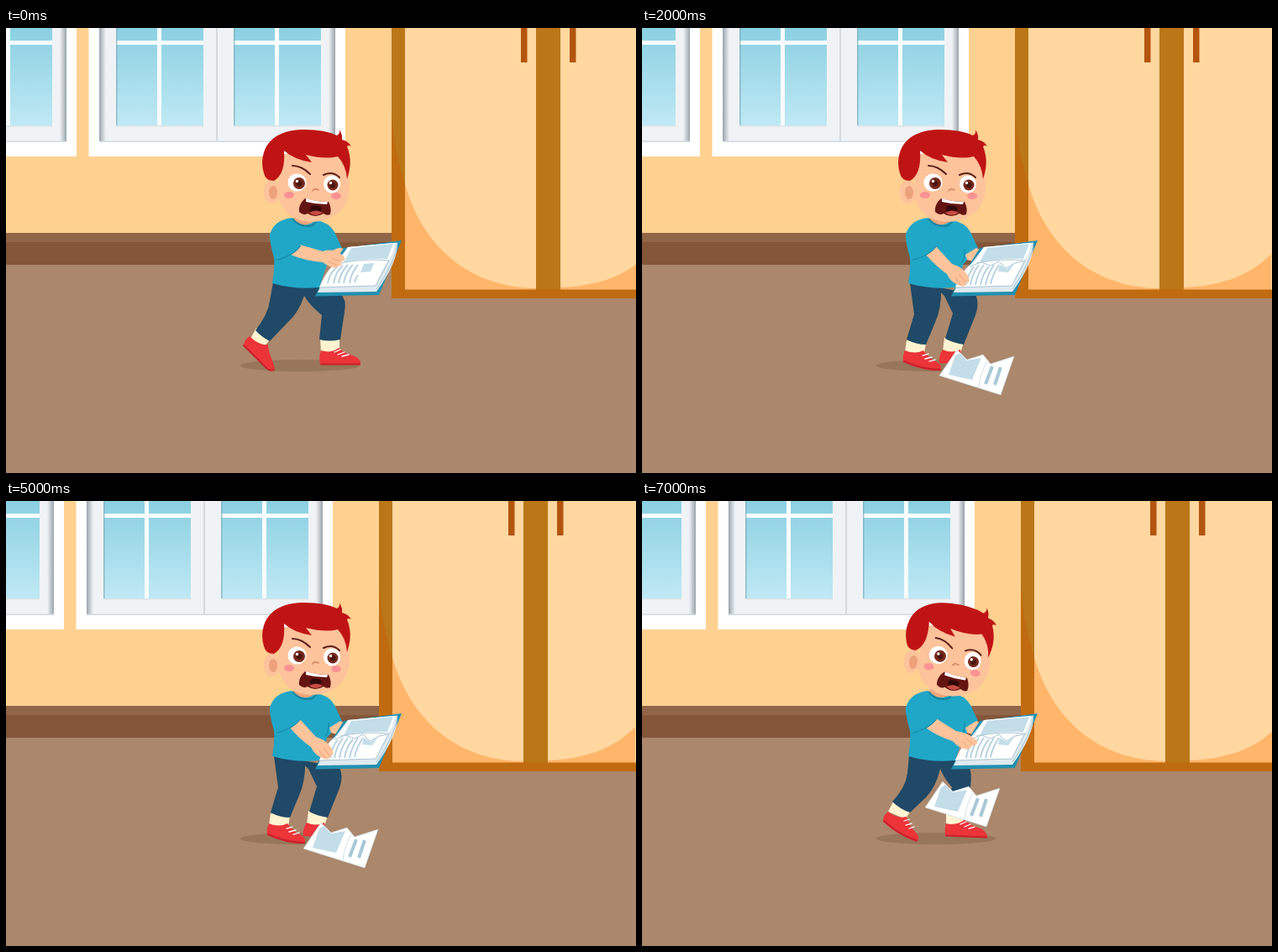
An HTML page for the animation above (8 s loop, 750 px wide and 530 px high).

```html
<!DOCTYPE html>
<html lang="en">
<head>
<meta charset="utf-8">
<title>Angry boy tearing a book</title>
<style>
  html, body { margin: 0; width: 100%; height: 100%; overflow: hidden; background: #ab876b; }
  svg { display: block; width: 750px; height: 530px; }
  .skin { fill: #fdc39b; }
  .jeans { fill: #1f4966; }
  .sock { fill: #fff3d0; }
  .shoe { fill: #ec3439; }
  .sole { fill: none; stroke: #c9202b; stroke-width: 2; stroke-linecap: round; }
  .lace { fill: none; stroke: #fff; stroke-width: 1.3; stroke-linecap: round; }
  .shirt { fill: #20a7c7; }
  .fold { fill: none; stroke: #15839f; }
  .ink { fill: #c3dde9; }
  .line { fill: none; stroke: #b9d3e0; stroke-width: 2; }
  .crease { fill: none; stroke: #ec9f78; stroke-width: 1; stroke-linecap: round; }
</style>
</head>
<body>
<svg viewBox="0 0 750 530">
  <defs>
    <linearGradient id="sky" gradientUnits="userSpaceOnUse" x1="0" y1="0" x2="0" y2="116">
      <stop stop-color="#8bd0e2"/><stop offset="1" stop-color="#bfe9f4"/>
    </linearGradient>
    <linearGradient id="shade">
      <stop stop-color="#98a4ac"/><stop offset="1" stop-color="#f0f3f5"/>
    </linearGradient>
    <g id="sash">
      <path fill="url(#sky)" d="M0 0H104V116H0Z"/>
      <path fill="#f8fbfc" d="M49 0h5v116h-5zM0 15h104v5H0z"/>
      <path fill="#7fa9b8" opacity=".7" d="M0 0h1.5v116H0z"/>
      <path fill="#dbe3e7" d="M0 116h104v1.5H0z"/>
    </g>
    <g id="window">
      <path fill="#fff" d="M98.500 0H404V153H98.500Z"/>
      <path fill="#f0f3f5" d="M111 0H392V136H111Z"/>
      <path fill="url(#shade)" d="M111 0h8v136h-8z"/>
      <path fill="url(#shade)" d="M111 0h8v136h-8z" transform="translate(503) scale(-1 1)"/>
      <path fill="#d3dbe0" d="M250 0h2v136h-2zM111 134.500h281v1.500H111z"/>
      <use href="#sash" x="131"/><use href="#sash" x="271"/>
    </g>
  </defs>

  <path fill="#ffd190" d="M0 0H750V245H0Z"/>
  <path fill="#916648" d="M0 244H750V255H0Z"/>
  <path fill="#83563a" d="M0 255H750V282H0Z"/>
  <path fill="#ab876b" d="M0 282H750V530H0Z"/>

  <g id="room">
    <use href="#window" x="-320"/><use href="#window"/>
    <path fill="#ba7617" d="M459 0H800V322H459Z"/>
    <path fill="#ffd79f" d="M475 0H631V312H475ZM660 0H800V312H660Z"/>
    <path fill="#ffb56a" d="M475 186C495 258 549 309 631 310V312H475ZM660 309C704 307 738 296 764 269V312H660Z"/>
    <path fill="#c16b10" d="M459 100C461 130 466 158 475 186V311.500H800V322H459Z"/>
    <path fill="#b3550f" d="M613 0h7.500v41h-7.500zM671 0h7.500v41h-7.500z"/>
  </g>

  <ellipse cx="350" cy="402" rx="71" ry="7" fill="#977659"/>

  <g data-pose="0">
    <path class="sock" d="M298 357L314 371L308 379L291 370Z"/>
    <path class="shoe" d="M290 367C297 374 304 378 312 377C312 387 318 396 320 406Q317 410 312 407L283 379Q283 372 290 367Z"/>
    <path class="sole" d="M283 378L311 406Q316 409 319 407"/>
    <path class="sock" d="M374 369H397V384L375 387Z"/>
    <path class="shoe" d="M375 384Q387 388 396 381Q404 388 415 391Q423 395 422 401H374Q372 392 375 384Z"/>
    <path class="sole" d="M375 400.500H421"/>
    <path class="lace" d="M391 386l7-3M395 389l8-3M400 391l8-2"/>
    <path class="jeans" d="M318 303L372 309L398 316Q406 324 403 338L398 371Q385 374 373 371L376 342Q362 331 355 319Q348 340 334 352L314 373Q304 368 297 360Q312 341 314 325Z"/>
  </g>

  <g data-pose="1">
    <path class="sock" d="M300 356L319 370L314 379L293 370Z"/>
    <path class="shoe" d="M293 370Q304 379 315 376Q318 387 327 396Q331 402 327 406Q304 398 287 382Q287 374 293 370Z"/>
    <path class="sole" d="M288 381Q305 397 327 404.500"/>
    <path class="lace" d="M312 381l6-2M314 386l7-2M318 390l6-2"/>
    <path class="sock" d="M362 372L383 375L382 386H362Z"/>
    <path class="shoe" d="M362 384Q373 387 384 380Q392 387 403 390Q411 394 411 401L361 399Q360 390 362 384Z"/>
    <path class="sole" d="M362 398.500L410 400.500"/>
    <path class="lace" d="M379 385l7-3M384 388l7-3M389 390l7-2"/>
    <path class="jeans" d="M318 303L372 309L390 316Q394 333 389 350L383 374L362 371L369 341Q360 331 355 319Q350 340 339 352L319 371Q307 367 298 358Q314 341 316 324Z"/>
  </g>

  <g data-pose="2">
    <path class="sock" d="M360 369L383 374L379 388L358 385Z"/>
    <path class="shoe" d="M358 383Q369 388 379 383Q382 391 374 400L354 399Q353 390 358 383Z"/>
    <path class="jeans" d="M348 308L397 317Q402 328 397 342L383 377Q370 375 361 370L370 340L360 319Z"/>
    <path class="sock" d="M315 372L338 375L336 388L313 386Z"/>
    <path class="shoe" d="M313 384Q325 389 335 384Q342 394 353 399Q358 403 355 408Q332 408 311 398Q310 390 313 384Z"/>
    <path class="sole" d="M312 397Q334 407 355 407"/>
    <path class="lace" d="M334 390l7-2M337 394l8-2M342 397l7-2"/>
    <path class="jeans" d="M319 304L356 310Q357 334 348 353L338 377Q326 377 315 371L324 341Z"/>
  </g>

  <path fill="#efa57d" d="M345 216H375L370 236Q357 243 342 226Z"/>
  <path class="shirt" d="M340 226Q354 241 369 229Q384 231 391 243L400 262L382 282L373 309Q345 312 317 304Q320 288 319 274Q315 260 314 247Q318 229 340 226Z"/>
  <path class="fold" stroke-width="2" d="M341 227Q351 239 365 235L370 230"/>
  <path class="fold" d="M384 264Q385 274 380 280"/>

  <g data-pose="1 2"><path class="skin" d="M385 270L398 262Q404 264 406 270L397 279L387 276Z"/></g>
  <g data-pose="0"><path class="skin" d="M387 267Q395 259 406 264L403 275H388Z"/></g>

  <!-- Book -->
  <path fill="#2290b0" d="M402 262L471 253L444 318L368 319.500L374 307Z"/>
  <path fill="#dfeaf0" d="M407 261L466 255.500Q467 278 441 314L371 315L381 295Z"/>
  <path fill="#fff" d="M407 261L463 256Q461 270 455 277Q447 288 440 307L373 309Q383 284 396 279Z"/>
  <path class="ink" d="M411 262L461 257L454 275Q427 274 402 279Z"/>
  <path fill="none" stroke="#a9c5d2" d="M398 280Q428 274 456 277L440 307L373 309M466 256Q464 278 441 311"/>
  <g data-pose="0">
    <path class="ink" d="M426 281L438 280L434 290L422 291Z"/>
    <path class="line" d="M395 284Q385 291 383 304M401 283Q392 291 390 304M407 282Q398 291 396 304M413 282Q404 291 402 304M419 282Q411 291 409 304M419 294Q416 298 415 303"/>
  </g>
  <g data-pose="1 2">
    <path fill="#fff" d="M390 284L404 279L415 283L425 278L433 286L444 280L454 278L440 306L373 308Z"/>
    <path class="ink" d="M426 282L434 287L443 281L436 291L424 290Z"/>
    <path class="line" d="M395 284Q388 293 386 306M401 282Q393 293 391 306M407 282Q399 293 397 306M413 284Q405 293 403 306M419 282Q411 294 409 306M425 282Q417 294 415 305"/>
    <path fill="none" stroke="#a9c5d2" d="M390 284L404 279L415 283L425 278L433 286L444 280L454 278"/>
  </g>

  <!-- Tearing arm -->
  <g data-pose="0">
    <path class="skin" d="M339 270L350 258L377 266Q392 261 403 273Q405 278 398 278L400 282L391 286Q382 283 377 279Q355 277 339 270Z"/>
    <path class="crease" d="M388 274l10 4M384 278l9 4"/>
  </g>
  <g data-pose="1">
    <path class="skin" d="M338 270L350 259L374 274Q390 276 399 286Q400 291 394 291L388 296Q377 295 370 286Q351 280 338 270Z"/>
    <path class="crease" d="M386 283l9 7M381 286l7 7"/>
  </g>
  <g data-pose="2">
    <path class="skin" d="M338 270L350 260L369 281Q383 285 389 297Q391 304 386 303Q386 309 379 307Q367 303 363 293Q349 283 338 270Z"/>
    <path class="crease" d="M378 294l7 9M373 297l6 9"/>
  </g>
  <path class="shirt" d="M329 231Q347 243 351 260Q342 272 322 277Q314 260 314 246Q318 235 329 231Z"/>
  <path class="fold" d="M322 276.500Q342 271 350.500 260"/>

  <g id="head">
    <ellipse class="skin" cx="316.500" cy="195" rx="10" ry="14"/>
    <ellipse cx="318" cy="196" rx="5" ry="8" fill="#eda27c"/>
    <path class="skin" d="M324 150H407L409 187Q409 206 398 218Q383 231 362 231Q334 229 325 204Z"/>
    <path fill="#c01414" d="M319 182Q309 182 307 173Q303 160 307 148C314 127 335 121 355 121Q380 121 394 128Q398 126 397 121Q401 128 400 133Q408 135 411 141Q408 139 406 141C412 156 410 168 406 180Q405 164 395 153Q380 157 357 151L364 160Q343 157 331 146Q333 174 319 182Z"/>
    <path fill="none" stroke="#5c211b" stroke-width="2" stroke-linecap="round" d="M341 164Q352 164 362 174M378 175Q389 170 397 178"/>
    <ellipse cx="346.500" cy="184" rx="11" ry="10.500" fill="#fff"/>
    <ellipse cx="388" cy="186" rx="10" ry="10.500" fill="#fff"/>
    <g fill="#762a1c"><circle cx="349" cy="185" r="7"/><circle cx="389" cy="187" r="6.500"/></g>
    <g fill="#4a1510"><circle cx="349" cy="185" r="3.500"/><circle cx="389" cy="187" r="3.500"/></g>
    <g fill="#fff"><circle cx="346.500" cy="182.500" r="1.700"/><circle cx="386.500" cy="184.500" r="1.700"/></g>
    <path fill="none" stroke="#d4805d" stroke-width="1.500" stroke-linecap="round" d="M365 194Q367 190 372 193"/>
    <g fill="#f99292"><ellipse cx="337" cy="199" rx="6" ry="4"/><ellipse cx="393" cy="200" rx="6" ry="4"/></g>
    <path fill="#641512" d="M356 203Q370 207 384 207Q388 215 386 222Q382 224 378 221Q368 227 359 221Q354 224 349 219Q348 210 356 203Z"/>
    <path fill="#fff" d="M357 203Q370 207 383 207L382 210Q369 210 357 207Z"/>
    <path fill="#32090b" d="M362 213Q369 209 376 214L374 220H363Z"/>
    <path fill="#c94c43" d="M361 220Q369 215 377 220Q368 226 361 220Z"/>
  </g>

  <g data-pose="1 2" id="sheet">
    <path fill="#fff" stroke="#c2d5de" stroke-width=".6" d="M375 383L387 395L406 389L415 400L443 391L427 437L354 414Z"/>
    <path class="ink" d="M373 390L378 387L387 396L404 393L393 419L365 413Z"/>
    <path fill="none" stroke="#d1e1e8" d="M411 397Q403 410 401 428"/>
    <path fill="none" stroke="#a9c8d7" stroke-width="4" d="M417 403L409 424M427 404L420 425"/>
  </g>
</svg>
<script>
  const find = id => document.getElementById(id);
  const parts = document.querySelectorAll('[data-pose]');
  const poseTime = 1000, loopTime = 8000;
  const roomShift = [0, -8, -15];
  let shown = -1;

  function draw(now) {
    const pose = Math.floor(now % loopTime / poseTime) % 3;
    if (pose !== shown) {
      shown = pose;
      parts.forEach(part => part.style.display = part.dataset.pose.includes(pose) ? '' : 'none');
      find('room').setAttribute('transform', `translate(${roomShift[pose]})`);
      find('head').setAttribute('transform', `rotate(${pose === 1 ? 7 : 0} 354 234)`);
      find('sheet').setAttribute('transform', pose === 1 ? 'translate(-17 -49)' : '');
    }
    requestAnimationFrame(draw);
  }
  draw(performance.now());
</script>
</body>
</html>
```
